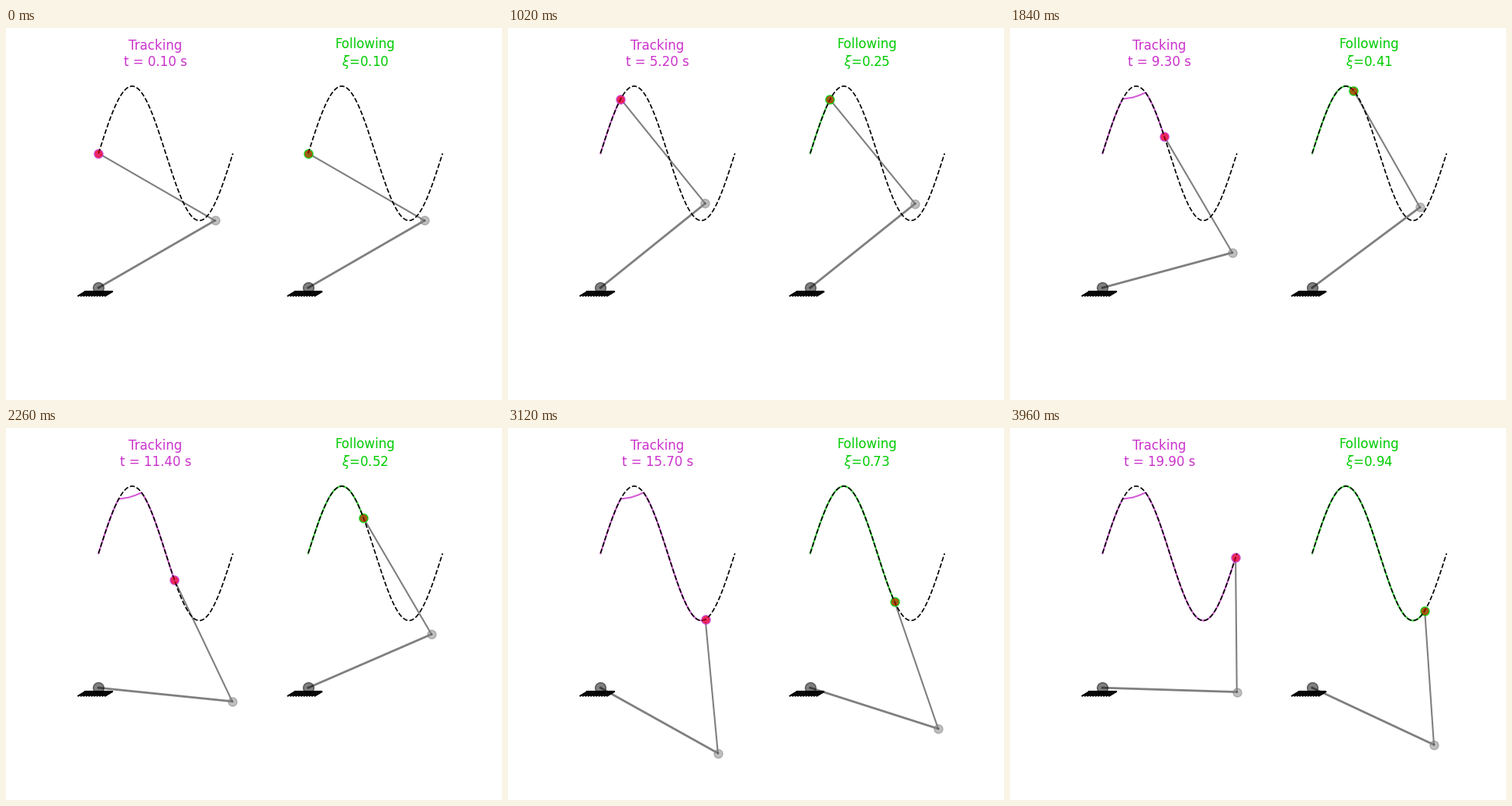
Recreate the animation shown at these times as a matplotlib script. Size 640 px wide and 480 px high, loop 3.98 s.

```python
import numpy as np
import matplotlib.pyplot as plt
from matplotlib.animation import FuncAnimation

FRAMES = 199
INTERVAL = 20
STEP = 0.005                 # path progress per frame
STOP, GO, CAUGHT = 30, 60, 64  # arm blocked, released, back on the curve
MAGENTA = (0.8, 0.2, 0.8)
GREEN = (0, 0.8, 0)


def curve(x):
    return np.array([x, 1 + 0.5 * np.sin(2 * np.pi * x)])


def elbow(tip):
    """Joint position of an arm with two unit links."""
    angle = np.arctan2(tip[1], tip[0]) - np.arccos(np.hypot(*tip) / 2)
    return np.array([np.cos(angle), np.sin(angle)])


def progress(i):
    """Path parameter that waits while the arm is blocked."""
    return STEP * (min(i, STOP) + max(i - GO, 0))


def tracking_tip(i):
    if i <= STOP or i >= CAUGHT:
        return curve(STEP * i)
    start, end = curve(STEP * STOP), curve(STEP * CAUGHT)
    s = np.clip((i - GO) / (CAUGHT - GO), 0, 1)
    s = 1 - (1 - s) ** 2
    return start + (end - start) * s - [0, 0.01 * np.sin(np.pi * s)]


def following_tip(i):
    return curve(max(progress(i) - STEP / 2, 0))


class Arm:
    def __init__(self, ax, color, tip_at):
        self.path = np.array([tip_at(i) for i in range(FRAMES)])
        ax.set_xlim(-0.227, 1.073)
        ax.set_ylim(-0.5306, 1.6006)
        ax.axis("off")
        self.title = ax.set_title("", color=color)

        self.draw_ground(ax)
        ax.plot(0, 0, "o", color="k", ms=10, alpha=0.5, zorder=3)
        self.upper, = ax.plot([], [], color="k", lw=2, alpha=0.5, zorder=3)
        self.fore, = ax.plot([], [], color="k", lw=1.5, alpha=0.5, zorder=3)
        self.joint, = ax.plot([], [], "o", color="gray", ms=8, alpha=0.5, zorder=3)
        self.trace, = ax.plot([], [], color=color, lw=1.5, alpha=0.8, zorder=4)
        self.ring, = ax.plot([], [], "o", color=color, ms=8, alpha=0.8, zorder=5)
        xs = np.linspace(0, 1, 201)
        ax.plot(*curve(xs), "k--", lw=1.2, zorder=6)
        self.core, = ax.plot([], [], "o", color="r", ms=6, alpha=0.5, zorder=7)

    @staticmethod
    def draw_ground(ax):
        ax.plot([-0.1, 0.1], [-0.03, -0.03], "k", lw=1.5)
        for x in np.linspace(-0.1, 0.1, 11):
            ax.plot([x, x - 0.05], [-0.03, -0.06], "k", lw=1.5)

    def pose(self, i):
        tip = self.path[i]
        mid = elbow(tip)
        self.upper.set_data([0, mid[0]], [0, mid[1]])
        self.fore.set_data([mid[0], tip[0]], [mid[1], tip[1]])
        self.joint.set_data([mid[0]], [mid[1]])
        self.trace.set_data(*self.path[:i + 1].T)
        for dot in (self.ring, self.core):
            dot.set_data([tip[0]], [tip[1]])


fig, axes = plt.subplots(1, 2, figsize=(6.4, 4.8), dpi=100)
tracker = Arm(axes[0], MAGENTA, tracking_tip)
follower = Arm(axes[1], GREEN, following_tip)


def update(i):
    tracker.pose(i)
    follower.pose(i)
    tracker.title.set_text(f"Tracking\nt = {0.1 * (i + 1):.2f} s")
    xi = 0.1 + progress(i) + 1e-6
    follower.title.set_text(f"Following\n$\\xi$={xi:.2f}")
    return []


anim = FuncAnimation(fig, update, frames=FRAMES, interval=INTERVAL,
                     repeat=True, repeat_delay=0)
plt.show()
```
